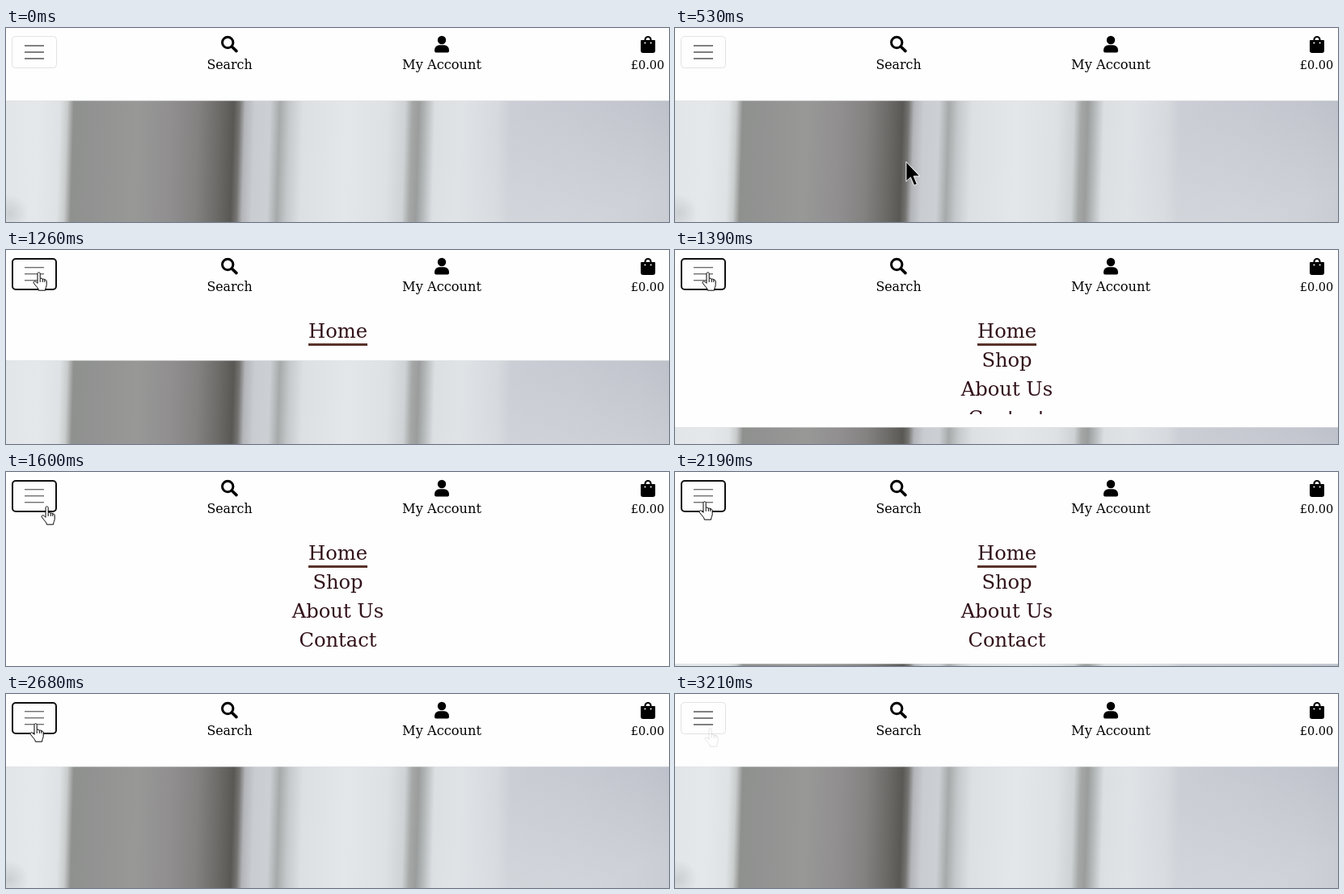
These frames come from a looping animation (820 by 241 pixels, 3.28 s). An HTML page with a canvas:

```html
<!DOCTYPE html>
<html lang="en">
<head>
<meta charset="utf-8">
<title>Collapsing menu</title>
<style>
  html, body { margin: 0; width: 100%; height: 100%; overflow: hidden; background: #fefefe; }
  canvas { display: block; }
</style>
</head>
<body>
<canvas id="stage" width="820" height="241"></canvas>
<script>
const W = 820, H = 241, LOOP = 3280;
const START = 385, TICK = 66.8;
const CLOSED = 90, MENU = 158;
const OPEN_AT = 1170, CLOSE_AT = 2157, SLIDE = 416;
const SERIF = '"DejaVu Serif", "Noto Serif", serif';
const ctx = document.getElementById('stage').getContext('2d');

const lerp = (a, b, p) => a + (b - a) * p;
const clamp = p => Math.min(1, Math.max(0, p));

// CSS "ease": cubic-bezier(.25, .1, .25, 1)
function ease(x) {
  if (x <= 0 || x >= 1) return clamp(x);
  const curve = (a, b, s) => 3 * a * s * (1 - s) ** 2 + 3 * b * s * s * (1 - s) + s ** 3;
  let lo = 0, hi = 1;
  for (let i = 0; i < 20; i++) {
    const mid = (lo + hi) / 2;
    if (curve(.25, .25, mid) < x) lo = mid; else hi = mid;
  }
  return curve(.1, 1, lo);
}

function text(str, x, y, size, color) {
  ctx.font = `${size}px ${SERIF}`;
  ctx.textAlign = 'center';
  ctx.fillStyle = color;
  ctx.fillText(str, x, y);
}

function disc(x, y, r, color) {
  ctx.fillStyle = color;
  ctx.beginPath();
  ctx.arc(x, y, r, 0, 7);
  ctx.fill();
}

function box(x, y, w, h, r) {
  ctx.beginPath();
  ctx.roundRect(x, y, w, h, r);
}

function stroke(color, width) {
  ctx.strokeStyle = color;
  ctx.lineWidth = width;
  ctx.stroke();
}

function toggler(focused) {
  if (focused) {
    box(8, 11, 54, 38, 4);
    stroke('#101010', 2);
  } else {
    box(7.5, 10.5, 55, 39, 4);
    stroke('#e2e2e2', 1);
  }
  ctx.fillStyle = focused ? '#707070' : '#7f7f7f';
  const h = focused ? 1.4 : 2;
  for (let i = 0; i < 3; i++) ctx.fillRect(23, 21 + i * 8, 24, h);
}

function header(focused) {
  toggler(focused);

  ctx.lineCap = 'round';
  ctx.beginPath();
  ctx.arc(274.2, 18, 6.7, 0, 7);
  stroke('#000', 3);
  ctx.beginPath();
  ctx.moveTo(279.5, 23.3);
  ctx.lineTo(285, 28.6);
  stroke('#000', 3.6);

  disc(539, 15, 5.2, '#000');
  box(530, 21.3, 18, 9.2, [6, 6, 2, 2]);
  ctx.fill();

  box(785, 15, 18, 16, [1, 1, 3, 3]);
  ctx.fill();
  ctx.beginPath();
  ctx.arc(794, 14.5, 3.5, Math.PI, 0);
  stroke('#000', 2.2);
  disc(790.4, 18.5, 1, '#fff');
  disc(797.6, 18.5, 1, '#fff');

  text('Search', 276.5, 51, 15.8, '#000');
  text('My Account', 539, 51, 16.2, '#000');
  text('£0.00', 793.5, 51, 14.5, '#000');
}

function menu(bottom) {
  ctx.save();
  ctx.beginPath();
  ctx.rect(0, 74, W, bottom - 74);
  ctx.clip();
  ['Home', 'Shop', 'About Us', 'Contact'].forEach((label, i) =>
    text(label, 410.5, 108.5 + i * 36, 24.2, '#32121a'));
  ctx.fillStyle = '#583229';
  ctx.fillRect(374, 116, 73, 3);
  ctx.restore();
}

const drapes = ctx.createLinearGradient(0, 0, W, 0);
`0 e2e6e8,38 e4e8ea,64 dfe2e4,73 c9cccc,81 8f918f,105 919291,160 989897,200 918f90,
235 848281,262 6c6a67,279 595854,286 747371,293 b2b4b8,305 c9ccd1,324 cccfd3,336 a7aaaa,
348 c5c9cb,365 dce0e3,420 e3e7ea,470 dde1e4,491 ced2d4,500 a4a7a6,508 9a9d9c,518 babdbe,
528 dbdfe2,560 e0e3e6,606 d6d9dd,622 cbced5,700 c6c9d1,780 bec1ca,820 b6bac4`
  .split(',').forEach(stop => {
    const [x, color] = stop.trim().split(' ');
    drapes.addColorStop(x / W, '#' + color);
  });

const sheen = ctx.createLinearGradient(640, 20, 700, 160);
sheen.addColorStop(0, 'rgba(225,228,230,0)');
sheen.addColorStop(1, 'rgba(225,228,230,.45)');

const shade = ctx.createRadialGradient(4, 140, 0, 4, 140, 24);
shade.addColorStop(0, 'rgba(150,155,158,.3)');
shade.addColorStop(1, 'rgba(150,155,158,0)');

function photo(top) {
  if (top >= H) return;
  ctx.save();
  ctx.translate(0, top);
  ctx.save();
  ctx.transform(1, 0, -.03, 1, 3, 0); // the folds lean slightly
  ctx.fillStyle = drapes;
  ctx.fillRect(-10, 0, W + 20, H);
  ctx.restore();
  ctx.fillStyle = sheen;
  ctx.fillRect(530, 0, W - 530, H);
  ctx.fillStyle = shade;
  ctx.fillRect(0, 110, 40, 60);
  ctx.fillStyle = 'rgba(225,228,230,.5)';
  ctx.fillRect(0, 0, W, 1);
  ctx.restore();
}

const arrow = new Path2D('M.5 .5V24.5L6 19.4L10.3 29.5L14 27.9L9.8 18H17Z');
const hand = new Path2D(
  'M6 14V2.5C6 .2 9.2 .2 9.2 2.5V8.7C10 7.7 12 7.9 12.3 9.5' +
  'C13 8.5 14.6 8.9 14.8 10.3C15.8 9.7 17.2 10.3 17.2 11.8V16.3' +
  'C17.2 18.8 15.6 20 15.6 23.2H7.4C7.2 20.3 4.4 18.5 1.3 14.1' +
  'C.3 12.5 2.4 11 3.8 12.2Z');

function pointer(shape, x, y, fill, line, alpha = 1) {
  ctx.save();
  ctx.globalAlpha = alpha;
  ctx.translate(x, y);
  ctx.lineJoin = 'round';
  ctx.fillStyle = fill;
  ctx.fill(shape);
  ctx.strokeStyle = line;
  ctx.lineWidth = 1;
  ctx.stroke(shape);
  if (shape === hand) {
    ctx.beginPath();
    for (const x of [9.2, 12.3, 14.8]) {
      ctx.moveTo(x, 9.5);
      ctx.lineTo(x, 12.5);
    }
    ctx.stroke();
  }
  ctx.restore();
}

function cursor(step) {
  if (step < 0) return;
  if (step < 8) {
    const left = 1 - step / 7;
    pointer(arrow, 66 + 396 * left ** 1.755, 50 + 172 * left ** 1.17, '#000', '#fff');
    return;
  }
  if (step >= 42) {
    pointer(hand, 36, 42, '#fff', '#000', .1);
    return;
  }
  let x, y;
  if (step < 21) {
    const p = clamp((step - 15) / 3);
    x = lerp(33, 43, p);
    y = lerp(27, 42, p);
  } else {
    const p = clamp((step - 20) / 2);
    x = lerp(43, 29, p);
    y = lerp(42, 36, p);
  }
  pointer(hand, Math.round(x), Math.round(y), '#fff', '#000');
}

function draw(t) {
  // Motion advances in steps of about 15 per second.
  const step = Math.floor((t - START) / TICK);
  const now = START + step * TICK;
  const open = ease((now - OPEN_AT) / SLIDE) - ease((now - CLOSE_AT) / SLIDE);
  const top = Math.round(CLOSED + MENU * open);

  ctx.fillStyle = '#fefefe';
  ctx.fillRect(0, 0, W, H);
  header(step >= 11 && step < 42);
  if (open > 0) menu(top - 16);
  photo(top);
  cursor(step);
}

function loop() {
  draw(performance.now() % LOOP);
  requestAnimationFrame(loop);
}
loop();
</script>
</body>
</html>
```
